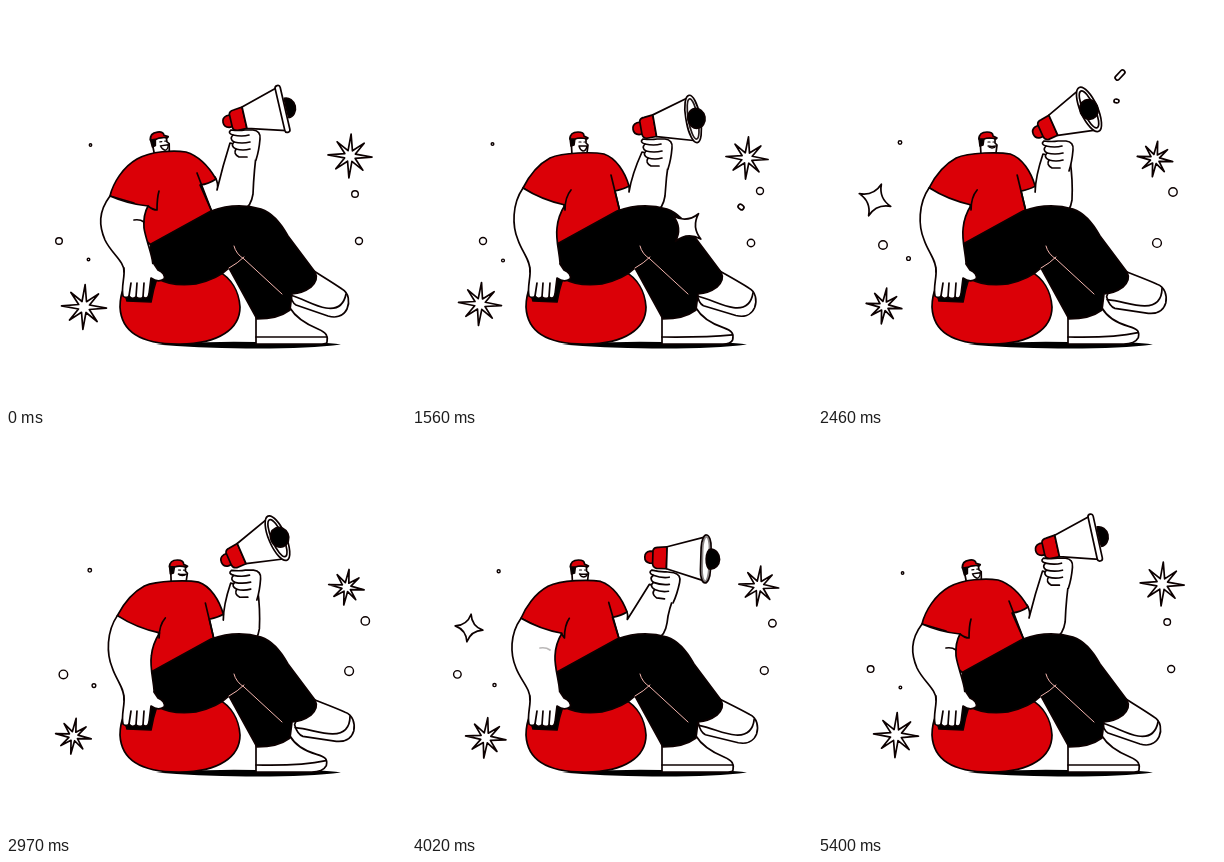
These frames come from a looping animation (400x400 px, 5430 ms). An HTML page:

```html
<!DOCTYPE html>
<html lang="en">
<head>
<meta charset="utf-8">
<title>Megaphone</title>
<style>
html, body { margin: 0; width: 100%; height: 100%; overflow: hidden; background: #fff; }
svg { display: block; width: 100vw; height: 100vh; }
</style>
</head>
<body>
<svg id="stage" viewBox="0 0 400 400" fill="#fff" stroke="#0c0000" stroke-width="1.7" stroke-linejoin="round" stroke-linecap="round"></svg>
<script>
const LOOP = 5430, STEP = 30;
const TIMES = [0, 690, 1560, 2460, 3480, 4530];
const RED = '#db0007', INK = '#000';
const stage = document.getElementById('stage');

// One value per entry of TIMES
const pose = {
  lean: [0, .3, 1, 1.02, 1, .4],
  headX: [153, 159, 166, 169, 172, 160],
  headTilt: [-8, -4, 0, 0, 2, -3],
  mouth: [1, .8, 1, .25, .2, .8],
  handX: [237, 235, 243, 238, 240, 257],
  handY: [137, 140, 146, 148, 150, 149],
  handTurn: [0, 0, 0, 0, 0, 12],
  elbowX: [247, 248, 253, 254, 253, 256],
  elbowY: [188, 188, 190, 194, 194, 184],
  hornX: [220, 218, 224, 218, 222, 245],
  hornY: [116, 121, 123, 127, 126, 120],
  hornTurn: [-13, -16, -10, -24, -17, 15],
  open: [0, 0, .9, 1.2, 1, 0],
  bell: [4, 4, 3, 0, 5, 4],
  fingers: [0, 1, 0, 0, 0, 0],
  sparkleTurn: [0, 1, 12, 22, 12, 6]
};

// x positions, y positions, size when calm, size when lively
const stars = [
  [[78, 74, 68, 66, 70, 77], [301, 298, 298, 300, 304, 303], 22.5, 17],
  [[344, 339, 335, 337, 344, 348], [150, 151, 152, 153, 153, 151], 22, 17]
];
const dots = [
  [[349, 346, 348, 355, 362, 357], [188, 185, 185, 186, 188, 190], 3.3, 4.4],
  [[353, 346, 339, 339, 348, 355], [235, 236, 237, 237, 237, 236], 3.5, 4.6],
  [[53, 63, 71, 65, 50, 44], [235, 234, 235, 239, 241, 239], 3.3, 4.5],
  [[84.5, 82.5, 80.5, 82, 85.5, 87], [139, 139, 138, 136.5, 136.5, 138], 1.2, 1.9],
  [[82.5, 87, 91, 90.5, 85, 81], [253.5, 254.5, 254.5, 252.5, 251, 251.5], 1.3, 2]
];
// x, y, length, angle, time of full size
const bits = [
  [113, 142, 10, -40, 690], [329, 201, 6, 40, 1560],
  [302, 69, 12, -47, 2460], [298.5, 95, 5, 10, 2460],
  [311, 73.5, 10, -42, 3480], [304.5, 100.5, 5, -10, 3480],
  [114, 141, 8, -35, 3480], [336, 231, 10, 48, 4530]
];

function track(values, t) {
  const n = TIMES.length;
  const at = i => TIMES[(i + n) % n] + Math.floor(i / n) * LOOP;
  const val = i => values[(i + n) % n];
  let i = n - 1;
  while (TIMES[i] > t) i--;
  const span = at(i + 1) - at(i), u = (t - at(i)) / span;
  const slope = k => (val(k + 1) - val(k - 1)) / (at(k + 1) - at(k - 1)) * span;
  const u2 = u * u, u3 = u2 * u;
  return (2 * u3 - 3 * u2 + 1) * val(i) + (u3 - 2 * u2 + u) * slope(i)
    + (3 * u2 - 2 * u3) * val(i + 1) + (u3 - u2) * slope(i + 1);
}

const clamp = v => Math.min(1, Math.max(0, v));
const wave = (t, n) => (1 - Math.cos(2 * Math.PI * n * t / LOOP)) / 2;
const path = (d, extra = '') => `<path d="${d}" ${extra}/>`;
const line = (d, extra = '') => path(d, 'fill="none" ' + extra);
const group = (move, body) => `<g transform="${move}">${body}</g>`;
const red = `fill="${RED}"`, black = `fill="${INK}"`;

// Blends two path strings that share the same commands
function mix(a, b, k) {
  const to = b.match(/-?[\d.]+/g);
  let i = 0;
  return a.replace(/-?[\d.]+/g, v => (+v + (to[i++] - v) * k).toFixed(2));
}

function spikes(x, y, count, long, short, inner, turn) {
  let d = '';
  for (let i = 0; i < count * 2; i++) {
    const r = i % 2 ? inner : i % 4 ? short : long;
    const a = turn + Math.PI * i / count;
    d += `${i ? 'L' : 'M'}${(x + r * Math.sin(a)).toFixed(2)} ${(y - r * Math.cos(a)).toFixed(2)}`;
  }
  return path(d + 'Z');
}

function sparkle(x, y, r, turn) {
  if (r < 1) return '';
  const c = r * .17;
  return group(`translate(${x} ${y}) rotate(${turn})`,
    path(`M0 ${-r}Q${c} ${-c} ${r} 0Q${c} ${c} 0 ${r}Q${-c} ${c} ${-r} 0Q${-c} ${-c} 0 ${-r}Z`));
}

function decor(t) {
  const lively = wave(t, 3), phase = t * 3 / LOOP % 1;
  const size = (calm, big) => calm + (big - calm) * lively;
  let out = '';
  for (const [xs, ys, calm, big] of stars) {
    const r = size(calm, big);
    out += spikes(track(xs, t), track(ys, t), 8, r, r * .87, r * .26, .05 + .12 * lively);
  }
  for (const [xs, ys, calm, big] of dots)
    out += `<circle cx="${track(xs, t)}" cy="${track(ys, t)}" r="${size(calm, big)}" stroke-width="1.4"/>`;
  for (const [x, y, len, angle, peak] of bits) {
    const u = (t - peak) / 360;
    if (Math.abs(u) >= 1) continue;
    const k = Math.cos(u * Math.PI / 2), h = Math.min(4.5, len * .75);
    out += group(`translate(${x} ${y}) rotate(${angle}) translate(${u * 4} 0) scale(${k})`,
      `<rect x="${-len / 2}" y="${-h / 2}" width="${len}" height="${h}" rx="2"/>`);
  }
  const grow = clamp(Math.min((phase - .04) / .22, (.64 - phase) / .12));
  return out + sparkle(57, 194, 17 * grow, track(pose.sparkleTurn, t));
}

function frontSparkle(t) {
  const phase = t * 3 / LOOP % 1;
  const grow = clamp(Math.min((phase - .66) / .16, (.975 - phase) / .05));
  return sparkle(275, 221.5, 18 * grow, 40);
}

function shoes(t) {
  const tap = clamp((wave(t, 4) - .1) * 1.6), kick = wave(t, 3);
  const standing = path(mix(
    'M250 306L284 302C290 312 300 318 312 323C321 327 322 330 321 336C321 338 319 338 316 338L250 338Z',
    'M250 306L284 302C288 310 296 315 308 315C319 315 321 318 319 323C310 336 297 338 285 338L250 338Z', tap))
    + line(mix('M250 331C275 331 295 331 321 331', 'M250 331C280 333 304 332 318 318', tap));
  const crossed = group(`translate(${4 * kick} ${3 * kick}) rotate(${-13 * kick} 297 280)`,
    path('M300 260C314 269 326 276 336 283C343 287 344 296 341 303C337 311 329 312 322 310L290 299Q285 296 284 286Z')
    + line('M284 289C298 293 308 300 320 302C332 304 338 298 340 288'));
  return standing + crossed;
}

function pants() {
  return path('M145 238L205 205Q230 196 255 203Q270 208 282 230L309 266Q313 274 305 281Q297 287 286 288'
    + 'L284 304Q272 313 251 313L223 262Q212 273 190 278Q165 281 151 272Q147 284 145 296L121 295L119 287L140 262Z', black)
    + line('M228 240Q230 248 238 253L276 288M223 262Q232 257 238 251', 'stroke="#f3b5ae" stroke-width="1"');
}

function rightArm(p) {
  const { handX: x, handY: y, elbowX: ex, elbowY: ey } = p;
  const near = mix('M206 207L194 177L209 171Q213 178 211 184', 'M208 207L201 182L215 177Q218 180 217 186', p.lean);
  return path(`${near}Q${(x + 197) / 2} ${y + 22} ${x - 13} ${y}L${x + 14} ${y + 6}`
    + `Q${ex + 1} ${y + 26} ${ex} ${ey}Q${ex - 2} ${ey + 13} ${ex - 10} ${ey + 16}Z`);
}

function fist(p) {
  const outline = 'M4 14L-4 14Q-10 11 -7 6Q-13 3 -9 -1Q-14 -4 -10 -8Q-16 -10 -12 -13Q-4 -12 2 -13L10 -13Q18 -12 17 -4Q16 8 13 17';
  return group(`translate(${p.handX} ${p.handY}) rotate(${p.handTurn})`,
    path(outline, 'stroke="none"') + line(outline)
    + line('M-9 -1Q-1 1 7 -1M-7 6Q0 8 7 6M-10 -8Q-1 -6 6 -8'));
}

function megaphone(p) {
  const o = Math.max(0, p.open), rx = 2.6 + 5 * o, b = 58 + p.bell;
  const ring = (w, h, round, extra = '') =>
    `<rect x="${58 - w}" y="${-h}" width="${2 * w}" height="${2 * h}" rx="${w}" ry="${round}" ${extra}/>`;
  const round = 2.6 + 21.4 * clamp(o);
  const inner = o > .1 ? ring(rx * .68, 24 - 4 * clamp(o), round, `stroke-opacity="${clamp(o)}"`) : '';
  const bell = path(`M${b} -10A9 10 0 0 1 ${b} 10A${9 * clamp(o) + .1} 10 0 0 1 ${b} -10Z`, black);
  return group(`translate(${p.hornX} ${p.hornY}) rotate(${p.hornTurn})`,
    path('M8 -6L2 -6Q-3 -5 -3 0Q-3 5 2 6L8 6Z', red)
    + path('M5 -7Q6 -10 10 -10L19 -11L19 11L9 11Q5 10 5 6Z', red)
    + path('M19 -11L57 -22L57 22L19 11Z') + ring(rx, 24, round) + inner + bell);
}

function head(p) {
  const m = clamp(p.mouth);
  return group(`translate(${p.headX} 137) rotate(${p.headTilt})`,
    path('M-7 -5L8 -5L8 0L10 2L9 10L-6 12Z')
    + path('M-8 -5L-3 -5L-4 2L-7 3Z', black)
    + path('M-8 -4Q-8 -11 0 -11Q6 -11 6 -7L10 -5L9 -4Q2 -6 -3 -4Z', red)
    + line('M1 -1L3 -1M6 -1L7 -1', 'stroke-width="1.2"')
    + path(`M1 3Q5 ${4 - m} 9 3Q8 ${4 + 4 * m} 5 ${4 + 4 * m}Q2 ${4 + 3 * m} 1 3Z`, 'stroke-width="1.4"'));
}

function shirt(k) {
  return path(mix(
    'M104 190C107 177 117 161 131 153C145 145 168 144 180 146C193 150 203 161 210 173Q203 178 194 179L206 206L145 239L128 225L128 197Z',
    'M111 182C116 172 125 159 138 152C151 146 182 146 192 148C204 152 213 166 217 180Q212 183 203 185L208 206L145 239L132 225L132 195Z', k), red)
    + line(mix('M206 206L191 167', 'M208 206L199 169', k));
}

function leftArm(p) {
  const k = p.lean, f = clamp(p.fingers);
  const arm = mix(
    'M104 190C92 206 93 220 99 234C105 247 119 256 118 266L146 266C150 256 140 236 138 222Q137 209 142 200Q122 198 104 190Z',
    'M111 182C100 198 100 220 106 234C110 246 119 255 118 266L148 266C150 254 143 236 145 222Q146 210 153 199Q130 194 111 182Z', k);
  const crease = mix('M153 185Q151 192 151 204Q147 204 142 200', 'M159 184Q153 191 153 204Q153 202 152 199', k);
  const palm = mix(
    'M118 262C119 272 115 280 117 290Q120 293 123 290Q126 294 130 291Q134 294 137 291Q142 294 143 288L145 272Q152 277 158 273Q160 268 152 264L148 258',
    'M118 262C119 271 112 274 109 282Q110 286 114 284Q116 290 121 286Q126 292 130 288Q136 293 139 288L146 272Q153 278 159 273Q159 268 152 266L148 258', f);
  const gaps = mix('M123 290L125 277M130 291L131 277M137 291L138 277', 'M114 284L121 276M121 286L127 277M130 288L133 278', f);
  return path(arm) + path(palm, 'stroke="none"') + line(palm) + line(gaps) + line(crease)
    + line('M128 214Q134 213 138 216', `stroke-opacity="${clamp(1 - k)}"`);
}

function render(t) {
  const p = {};
  for (const key in pose) p[key] = track(pose[key], t);
  stage.innerHTML = decor(t)
    + path('M150 338.5Q200 335 250 336Q310 335 335 338.5Q300 343 240 342.5Q190 342 150 338.5Z', black + ' stroke="none"')
    + path('M130 267C118 276 114 288 114 301C115 322 130 338 172 338C214 338.5 234 322 234 301C233 285 225 272 212 265Z', red)
    + rightArm(p) + megaphone(p) + fist(p)
    + head(p) + shirt(p.lean) + shoes(t) + pants() + leftArm(p) + frontSparkle(t);
}

const start = performance.now();
function tick() {
  const t = (performance.now() - start) % LOOP;
  render(Math.floor(t / STEP) * STEP);
  requestAnimationFrame(tick);
}
tick();
</script>
</body>
</html>
```
